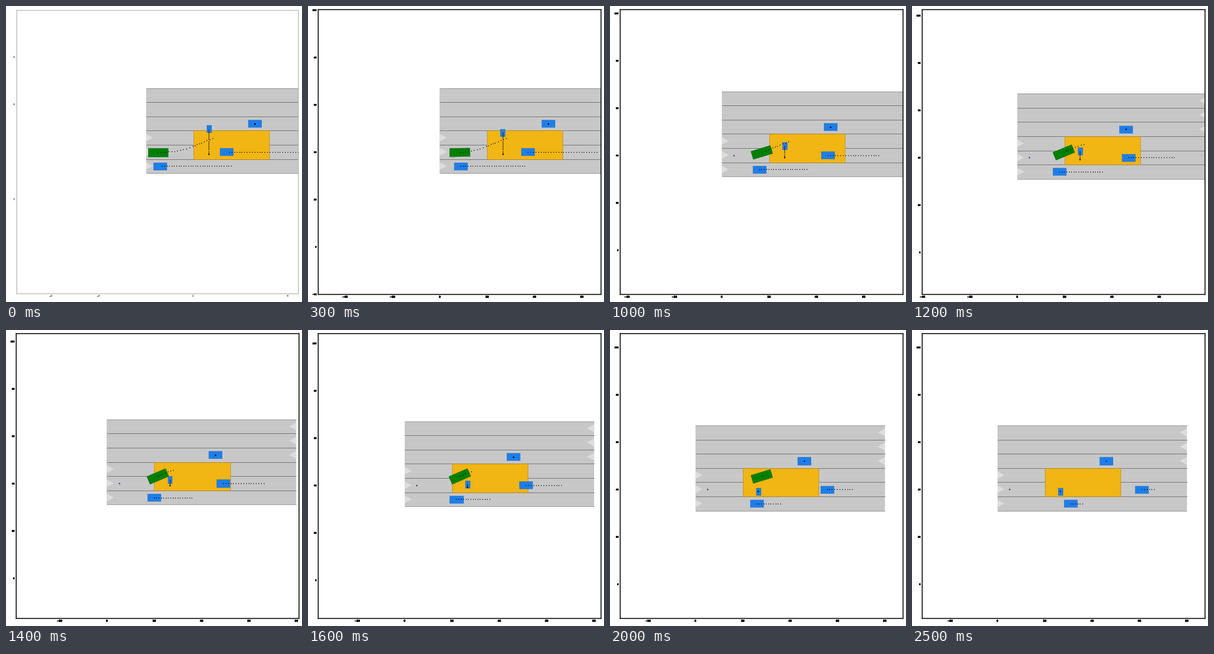
These frames come from a looping animation (450x450 px, 2600 ms). A matplotlib script:

```python
import numpy as np
import matplotlib.pyplot as plt
from matplotlib import patheffects
from matplotlib.animation import FuncAnimation
from matplotlib.patches import Polygon, Rectangle

SIZE, DPI = 450, 100
PX = 72 / DPI                 # points per pixel
SCALE = 3.6                   # pixels per metre
CENTER = np.array([230.8, 228.3])   # camera centre on the stage, from bottom left
STEPS, HORIZON, EGO_END = 26, 30, 20
ROAD_Y, LANE, LENGTH = 40, 6, 80
EGO_DROP = 0.25               # body centre below the tracked point, in metres
BLUE, BLUE_EDGE = "#1d7eea", "#1a68c4"

# Ego motion: x and heading at key steps, y follows from the heading
steps = np.arange(EGO_END + 1)
ego_x = np.interp(steps, [0, 6, 10, 12, 16, 20],
                  [5, 11.95, 16.95, 19.7, 23.33, 28.05])
heading = np.interp(steps, [0, 2.5, 6, 10, 12, 16, 20],
                    [0, 0, 8, 17, 22.5, 23.5, 17])
slope = np.tan(np.radians(heading))
rise = np.diff(ego_x) * (slope[1:] + slope[:-1]) / 2
ego_y = ROAD_Y + np.concatenate([[0], np.cumsum(rise)])

# Predicted motion of the other road users
k = np.arange(HORIZON + 1)
OBSTACLES = [
    (34 + 1.075 * k, ROAD_Y + 0 * k, 5.6, 3.1),
    (5.85 + k, ROAD_Y - 6 + 0 * k, 5.6, 3.1),
    (45.85 + 0 * k, ROAD_Y + 12 + 0 * k, 5.6, 3.1),
    (26.55 + 0 * k, ROAD_Y + 9.85 - 0.595 * np.minimum(k, 18), 1.9, 3.0),
]

fig = plt.figure(figsize=(SIZE / DPI, SIZE / DPI), dpi=DPI, facecolor="white")
ax = fig.add_axes([0, 0, 1, 1])


def box(x, y, length, width, face, edge, angle=0, z=4):
    ax.add_patch(Rectangle((x - length / 2, y - width / 2), length, width,
                           angle=angle, rotation_point="center", fc=face,
                           ec=edge, lw=0.5 * PX, zorder=z))


def dots(x, y, color="black", size=1.3, z=6):
    ax.plot(x, y, "o", color=color, ms=size * PX, mew=0, zorder=z)


def draw_road():
    low, high = ROAD_Y - 9, ROAD_Y + 27
    ax.add_patch(Rectangle((0, low), LENGTH, high - low, fc="#c7c7c7", lw=0))
    for i in range(7):
        y = low + i * LANE
        ax.plot([0, LENGTH], [y, y], lw=PX, zorder=2, solid_capstyle="butt",
                color="#a0a0a0" if i in (0, 6) else "#808080")
    for i in range(6):
        y = low + (i + 0.5) * LANE
        ax.plot([0, LENGTH], [y, y], lw=0.8 * PX, color="#cdcdcd", zorder=1.5)
        start, tip = (0, 3) if i < 3 else (LENGTH, LENGTH - 3)
        ax.add_patch(Polygon([(start, y - 1.6), (tip, y), (start, y + 1.6)],
                             fc="#dddddd", lw=0, zorder=2.5))
    box(36, ROAD_Y + 3, 32, 12, "#f1b514", "#a87f1c", z=3)


def style_labels(first):
    ax.tick_params(axis="x", length=0, pad=1.7, labelsize=2 if first else 2.6)
    ax.tick_params(axis="y", length=0, pad=1.5, labelsize=2 if first else 2.1)
    stroke = patheffects.withStroke(linewidth=0.5, foreground="black")
    for label in ax.get_xticklabels() + ax.get_yticklabels():
        label.set_fontfamily("DejaVu Sans")
        label.set_fontweight("normal" if first else "bold")
        label.set_path_effects([] if first else [stroke])


def set_view(t, x, y):
    first = t == 0
    left, bottom, right, top = (16, 13, 444, 444) if first else (15, 12, 445, 445)
    ax.set_position([left / SIZE, bottom / SIZE,
                     (right - left) / SIZE, (top - bottom) / SIZE])
    xlim = x + (np.array([left, right]) - CENTER[0]) / SCALE
    ylim = y + (np.array([bottom, top]) - CENTER[1]) / SCALE
    ticks = np.arange(-60, 141, 20)
    if first:
        xticks, yticks = [-40, -20, 20, 60], [-20, 20, 60, 80]
    else:
        xticks = [v for v in ticks if xlim[0] <= v <= xlim[1]]
        yticks = [v for v in ticks if ylim[0] <= v <= ylim[1]]
    ax.set_xticks(xticks)
    ax.set_yticks(yticks)
    ax.set_xlim(xlim)
    ax.set_ylim(ylim)
    style_labels(first)
    for spine in ax.spines.values():
        spine.set_linewidth((0.6 if first else 1.4) * PX)
        spine.set_edgecolor("#808080" if first else "black")
        spine.set_zorder(10)


def draw(t):
    ax.clear()
    now = min(t, EGO_END)
    draw_road()
    dots(5.1, ROAD_Y, "#10108c", 2, z=3.5)
    for x, y, length, width in OBSTACLES:
        box(x[t], y[t], length, width, BLUE, BLUE_EDGE)
        first = max(t, 1)
        dots(x[first:], y[first:])
    if t <= EGO_END:
        box(ego_x[t], ego_y[t] - EGO_DROP, 8.5, 3.5, "#008000", "#005a00",
            heading[t], z=5)
        dots(ego_x[t:], ego_y[t:])
    set_view(t, ego_x[now], ego_y[now])
    return []


anim = FuncAnimation(fig, draw, frames=STEPS, interval=100, repeat=True,
                     repeat_delay=0, init_func=lambda: [])
plt.show()
```
